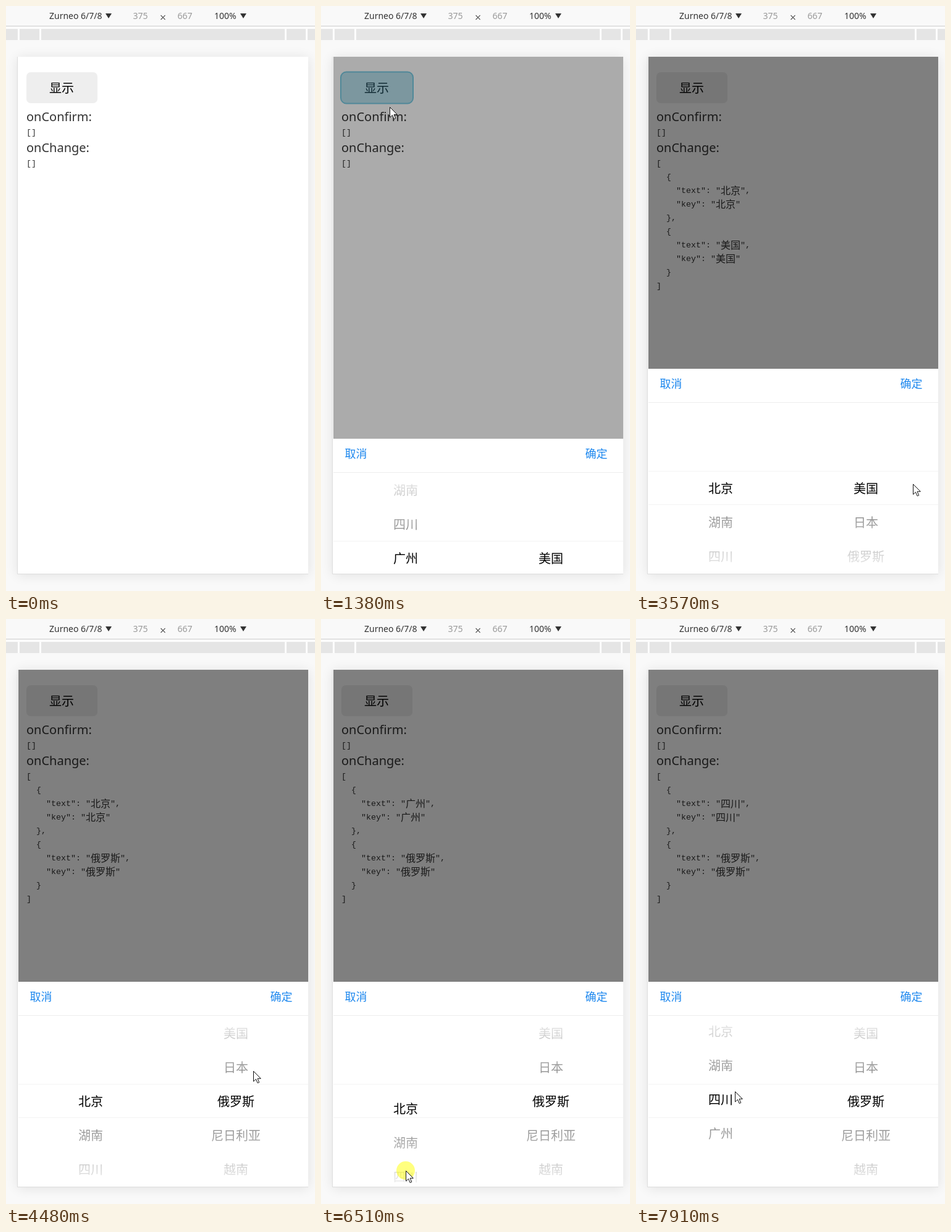
These frames come from a looping animation (500 px wide and 945 px high, 7990 ms). An HTML page:

```html
<!DOCTYPE html>
<html lang="zh">
<head>
<meta charset="utf-8">
<style>
html, body { margin: 0; width: 100%; height: 100%; overflow: hidden; background: #f9f9f9; }
svg { display: block; width: 500px; height: 945px; }
text { font-family: "Noto Sans CJK SC", "Noto Sans CJK", "Noto Sans CJK JP", sans-serif; font-weight: 350; white-space: pre; }
.ui { font-family: "Noto Sans", "Open Sans", sans-serif; font-weight: 400; }
.thin { font-weight: 300; }
.code { font-family: "Liberation Mono", monospace; font-size: 13.33px; font-weight: 400; }
.han { font-size: 16px; }
</style>
</head>
<body>
<svg viewBox="0 0 500 945" xmlns="http://www.w3.org/2000/svg">
  <defs>
    <filter id="blur" x="-20%" y="-20%" width="140%" height="140%"><feGaussianBlur stdDeviation="10"/></filter>
    <linearGradient id="fadeTop" x2="0" y2="1">
      <stop offset="0" stop-color="#fff" stop-opacity=".95"/><stop offset="1" stop-color="#fff" stop-opacity=".5"/>
    </linearGradient>
    <linearGradient id="fadeBottom" x2="0" y2="1">
      <stop offset="0" stop-color="#fff" stop-opacity=".5"/><stop offset="1" stop-color="#fff" stop-opacity=".95"/>
    </linearGradient>
    <clipPath id="screen"><rect x="19" y="82" width="470" height="835"/></clipPath>
    <clipPath id="list"><rect x="20" y="641" width="469" height="276"/></clipPath>
  </defs>

  <rect width="500" height="945" fill="#f9f9f9"/>
  <rect x="19" y="84" width="470" height="835" opacity=".1" filter="url(#blur)"/>
  <rect width="500" height="55" fill="#fdfdfd"/>
  <rect width="500" height="32" fill="#f9f9f9"/>
  <path d="M0 32.5H500" stroke="#ccc"/>
  <path d="M0 37h19v18H0zM22 37h32v18H22zM57 37h394v18H57zM454 37h31v18H454zM488 37h12v18H488z" fill="#e5e5e5"/>
  <g font-size="14" fill="#333">
    <text class="ui" x="70" y="21">Zurneo 6/7/8</text>
    <text class="ui thin" x="205.5" y="21" fill="#999">375</text>
    <text class="ui thin" x="277.5" y="21" fill="#999">667</text>
    <text class="ui" x="337" y="21">100%</text>
    <path d="M161 12h10l-5 8zM379 12h10l-5 8z"/>
    <path d="M250.5 15l7 7m0-7l-7 7" stroke="#555" stroke-width="1.2"/>
  </g>

  <rect x="19" y="82" width="470" height="835" fill="#fff"/>
  <path d="M18.5 82V917.5H489" fill="none" stroke="#ddd"/>

  <g clip-path="url(#screen)">
    <g id="button">
      <rect x="33" y="107" width="115" height="50" rx="7" fill="#eee"/>
      <text x="90" y="140" font-size="20" text-anchor="middle">显示</text>
      <rect id="tapFill" x="32" y="106.5" width="117" height="51" rx="9" fill="#46c1e8"/>
      <rect id="tapRing" x="32" y="106.5" width="117" height="51" rx="9" fill="none" stroke="#6ac6e0" stroke-width="2"/>
    </g>
    <g fill="#333">
      <text class="ui" x="33" y="186" font-size="20">onConfirm:</text>
      <text class="ui" x="33" y="236" font-size="20">onChange:</text>
      <g id="confirm"></g>
      <g id="change"></g>
    </g>
    <rect id="shade" x="20" y="82" width="469" height="835"/>
    <g id="panel">
      <rect x="20" y="586" width="469" height="331" fill="#fff"/>
      <g font-size="18" fill="#1c87ee">
        <text x="38.5" y="617">取消</text>
        <text x="427.5" y="617">确定</text>
      </g>
      <g clip-path="url(#list)">
        <g id="column0"></g>
        <g id="column1"></g>
        <rect x="20" y="641" width="469" height="111" fill="url(#fadeTop)"/>
        <rect x="20" y="806" width="469" height="111" fill="url(#fadeBottom)"/>
      </g>
      <path d="M20 640.5H489" stroke="#eee"/>
      <path d="M20 751.5H489M20 805.5H489" stroke="#f4f4f4"/>
    </g>
  </g>
  <circle id="press" r="15" fill="#ff0"/>
  <path id="cursor" d="M0 0V16.5L4 12.8L6.6 19L9.2 18L6.6 11.8H11.8Z" fill="#fff" stroke="#111" stroke-linejoin="round"/>
</svg>
<script>
const LOOP = 7990, ROW = 55, MID = 779, CLICK = 1080;
const $ = id => document.getElementById(id);

const columns = [
  { x: 137, row: 3, names: ["北京", "湖南", "四川", "广州"] },
  { x: 372, row: 0, names: ["美国", "日本", "俄罗斯", "尼日利亚", "越南"] }
];

// Pointer moves; a move with `drag` pulls that column along, one pixel per pixel.
const moves = [
  { at: 70, len: 610, to: [109, 142] },
  { at: 1310, len: 600, to: [157, 694] },
  { at: 2070, len: 170, to: [157, 736], drag: 0 },
  { at: 2340, len: 150, to: [157, 710] },
  { at: 2500, len: 430, to: [156, 815], drag: 0 },
  { at: 3080, len: 460, to: [448, 772] },
  { at: 3640, len: 240, to: [400, 840] },
  { at: 3880, len: 370, to: [400, 730], drag: 1 },
  { at: 4560, len: 290, to: [150, 840] },
  { at: 4850, len: 250, to: [161, 730], drag: 0 },
  { at: 5340, len: 400, to: [140, 880] },
  { at: 5760, len: 200, to: [138, 822], drag: 0 },
  { at: 5980, len: 250, to: [137, 714] },
  { at: 6270, len: 240, to: [137, 891], drag: 0, hold: 60 },
  { at: 6570, len: 700, to: [160, 763], drag: 0, hold: 580 }
];

const clamp = (v, max = 1) => Math.max(0, Math.min(max, v));
const smooth = v => { const x = clamp(v); return x * x * (3 - 2 * x); };
const easeOut = (v, power) => 1 - Math.pow(1 - clamp(v), power);

// Replays the moves up to time t; a released column settles on its nearest row.
function replay(t) {
  let x = 405, y = 857, picked = false;
  let pressed = t >= CLICK - 20 && t < CLICK + 80;
  const rows = columns.map(c => c.row), chosen = [...rows];
  moves.forEach((m, i) => {
    if (t < m.at) return;
    const e = smooth((t - m.at) / m.len), dy = (m.to[1] - y) * e, c = m.drag;
    x += (m.to[0] - x) * e;
    y += dy;
    if (c === undefined) return;
    rows[c] -= dy / ROW;
    const release = m.at + m.len + (m.hold || 0);
    const next = moves[i + 1];
    if (t < release) pressed = true;
    else if (!next || next.drag === undefined) {
      chosen[c] = clamp(Math.round(rows[c]), columns[c].names.length - 1);
      rows[c] += (chosen[c] - rows[c]) * easeOut((t - release) / 200, 2);
      picked = true;
    }
  });
  return { x, y, pressed, rows, pick: picked ? chosen.map((n, c) => columns[c].names[n]) : [] };
}

// Monospaced lines: 8 px per Latin cell, 16 px per Han character.
function codeLines(lines, top) {
  return lines.map((line, n) => {
    let x = 33, out = "";
    for (const run of line.match(/[\u4e00-\u9fff]+|[^\u4e00-\u9fff]+/g)) {
      const han = run.charCodeAt(0) > 0x4dff, y = top + n * 22 + (han ? 5.5 : 3.5);
      const indent = run.length - run.trimStart().length;
      out += `<text class="${han ? "han" : "code"}" x="${x + indent * 8}" y="${y}">${run.trim()}</text>`;
      x += run.length * (han ? 16 : 8);
    }
    return out;
  }).join("");
}

const shift = (id, x, y) => $(id).setAttribute("transform", `translate(${x} ${y})`);
const alpha = (id, v) => $(id).setAttribute("opacity", v);

let shown;
function draw(t) {
  const open = easeOut((t - CLICK - 64) / 785, 3);
  shift("panel", 0, Math.round(331 * (1 - open)));
  alpha("shade", open / 2);

  const tapped = t >= CLICK;
  shift("button", 0, tapped && t < 1310 ? 2.5 : 0);
  alpha("tapFill", tapped ? .455 * (1 - clamp((t - 1230) / 500)) : 0);
  alpha("tapRing", tapped ? 1 - clamp((t - 1250) / 1100) : 0);

  const { x, y, pressed, rows, pick } = replay(t);
  rows.forEach((row, c) => shift("column" + c, 0, -row * ROW));
  shift("cursor", Math.round(x) + .5, Math.round(y) + .5);
  shift("press", x, y);
  alpha("cursor", t < moves[0].at ? 0 : 1);
  alpha("press", pressed ? .5 : 0);

  const json = JSON.stringify(pick.map(v => ({ text: v, key: v })), null, 2);
  if (json !== shown) $("change").innerHTML = codeLines((shown = json).split("\n"), 254);
}

columns.forEach((col, c) => {
  $("column" + c).innerHTML = col.names.map((name, i) =>
    `<text x="${col.x}" y="${MID + 7.5 + i * ROW}" font-size="20" text-anchor="middle">${name}</text>`).join("");
});
$("confirm").innerHTML = codeLines(["[]"], 204);

const start = performance.now();
function frame() {
  draw((performance.now() - start) % LOOP);
  requestAnimationFrame(frame);
}
frame();
</script>
</body>
</html>
```
